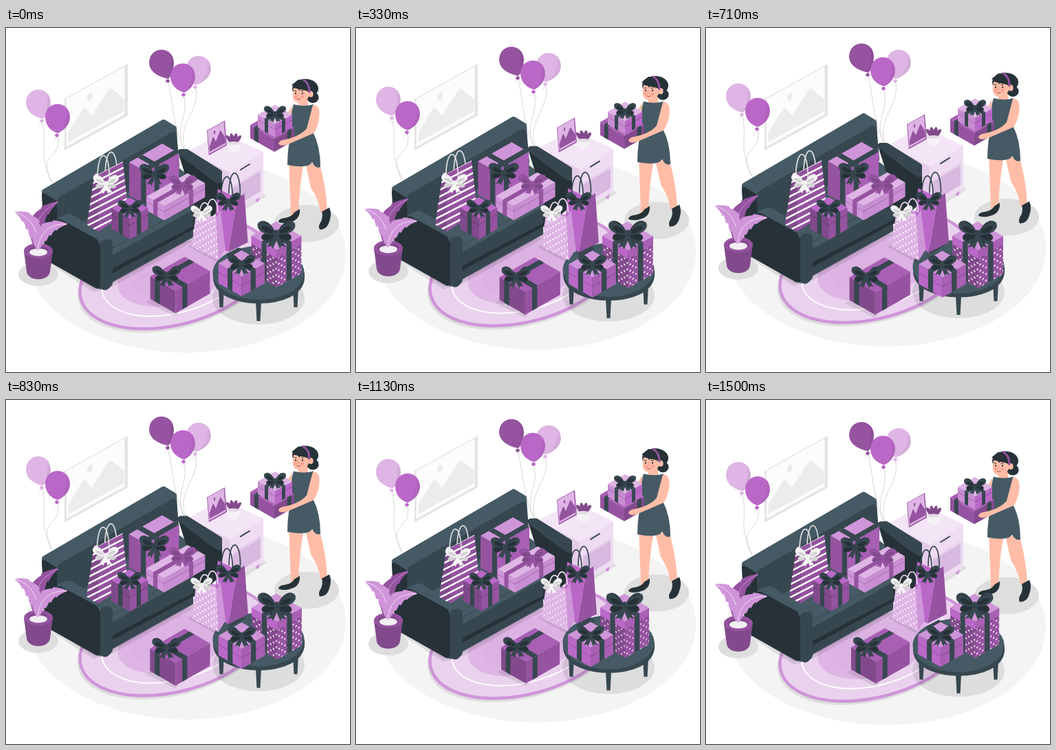
These frames come from a looping animation (500 px wide and 500 px high, 1540 ms). An HTML page:

```html
<!DOCTYPE html>
<html lang="en">
<head>
<meta charset="utf-8">
<title>Gifts</title>
<style>
html, body { margin: 0; height: 100%; overflow: hidden; background: #fff; }
svg { display: block; width: 100vw; height: 100vh; }
</style>
</head>
<body>
<svg viewBox="0 0 500 500" xmlns="http://www.w3.org/2000/svg">
<defs>
  <pattern id="dots" width="8" height="9" patternUnits="userSpaceOnUse">
    <circle cx="2" cy="2" r="1.1" fill="#fff"/><circle cx="6" cy="6.500" r="1.1" fill="#fff"/>
  </pattern>
  <pattern id="dotsL" href="#dots" patternTransform="skewY(30)"/>
  <pattern id="dotsR" href="#dots" patternTransform="skewY(-30)"/>
  <pattern id="stripes" width="10" height="9.4" patternUnits="userSpaceOnUse" patternTransform="skewY(-27)">
    <rect width="10" height="2.8" fill="#fff"/>
  </pattern>
</defs>
<g id="wall"></g><g id="room"></g><g id="gifts"></g>
</svg>
<script>
const TONE = { deep: '#824a8c', dark: '#9553a0', mid: '#a85fb4', base: '#ba68c8', soft: '#c98dd3', light: '#cf95d9', pale: '#deb5e4', mist: '#ead2ee' };
const INK = '#263238', SLATE = '#37474f', STEEL = '#455a64', SKIN = '#ffbda7', GREY = '#dedede', SHADE = '#00000018';
const ISO = .57;

const path = (d, fill) => `<path d="${d}" fill="${fill}"/>`;
const poly = (points, fill) => `<polygon points="${points}" fill="${fill}"/>`;
const line = (d, color, w = 1) => `<path d="${d}" fill="none" stroke="${color}" stroke-width="${w}" stroke-linecap="round" stroke-linejoin="round"/>`;
const oval = (x, y, rx, ry, fill, turn = 0, extra = '') =>
  `<ellipse cx="${x}" cy="${y}" rx="${rx}" ry="${ry}" fill="${fill}" transform="rotate(${turn} ${x} ${y})" ${extra}/>`;
// Polygon with corners rounded outwards by r.
const soft = (points, fill, r) =>
  `<polygon points="${points}" fill="${fill}" stroke="${fill}" stroke-width="${2 * r}" stroke-linejoin="round"/>`;

function bow(x, y, size, color = SLATE, shade = INK) {
  const wing = path('M0 0L-11 16-6 15-4 18 2 4Z', color) + path('M0 0C-8-2-18 0-17 6C-15 11-5 8 0 0Z', shade)
    + path('M-1 2C-4-12-16-18-21-11C-24-3-12 3-1 2Z', color) + path('M-2 0C-7-7-14-9-17-7C-16-2-9 1-2 0Z', shade)
    + line('M-2-2Q-7-11-14-12M-3 3L-8 12', shade, .8);
  return `<g transform="translate(${x} ${y}) scale(${size})">${wing}<g transform="scale(-1 1)">${wing}</g>`
    + oval(0, 0, 4, 3.6, color) + line('M-2-2Q0-1 0 3', shade, .7) + '</g>';
}

// Isometric gift: (x, y) is the front top corner, l and r the widths seen left and right,
// u and v the places of the ribbons along them; tones name the left, right and top faces.
function gift(x, y, l, r, h, tones, { u = .5, v = .5, w = 7, lid = 0, dots, ribbon = [SLATE, INK], knot = 1, drop = 0 } = {}) {
  const [left, right, top] = tones.split(' ').map(name => TONE[name]);
  const at = (a, b, z = 0) => [x - a * l + b * r, y - ISO * (a * l + b * r) + z];
  const quad = (fill, ...points) => poly(points.join(' '), fill);
  const sideL = (a, b, z0, z1, fill) => quad(fill, at(a, 0, z0), at(b, 0, z0), at(b, 0, z1), at(a, 0, z1));
  const sideR = (a, b, z0, z1, fill) => quad(fill, at(0, a, z0), at(0, b, z0), at(0, b, z1), at(0, a, z1));
  const lay = (a0, a1, b0, b1, fill) => quad(fill, at(a0, b0), at(a1, b0), at(a1, b1), at(a0, b1));
  const sides = (z0, z1, fillL, fillR = fillL) => sideL(0, 1, z0, z1, fillL) + sideR(0, 1, z0, z1, fillR);
  const du = w / l / 2, dv = w / r / 2;
  let s = sides(0, h, left, right);
  if (dots) s += sides(lid, h, 'url(#dotsL)', 'url(#dotsR)') + sides(0, lid, TONE.base, TONE.mid);
  if (lid) s += sides(lid, lid + 1.2, '#00000030');
  s += lay(0, 1, 0, 1, top) + lay(u - du, u + du, 0, 1, ribbon[0]) + lay(0, 1, v - dv, v + dv, ribbon[0]);
  s += sideL(u - du, u + du, 0, h, ribbon[0]) + sideR(v - dv, v + dv, 0, h, ribbon[0]);
  const [cx, cy] = at(u, v);
  return s + bow(cx, cy + drop, knot, ...ribbon);
}

// Bag from its left, middle and right edges, each written "top bottom".
function bag(edges, tones, pattern, [hx, hy, hw, hh], cord) {
  const [a, b, c] = edges.map(e => e.split(' '));
  const faces = [[a, b], [b, c]].map(([p, q]) => [p[0], q[0], q[1], p[1]].join(' '));
  const loop = (x, y) => line(`M${x} ${y}C${x} ${y - hh * 1.35} ${x + hw} ${y - hh * 1.35} ${x + hw} ${y}`, cord, 1.7);
  return loop(hx + 11, hy - 5) + faces.map((f, i) => poly(f, TONE[tones[i]]) + (pattern[i] ? poly(f, `url(#${pattern[i]})`) : '')).join('') + loop(hx, hy);
}

// Framed landscape on a wall, drawn in a unit square.
const picture = (x, y, w, h, lean, frame, back, hills) =>
  `<g transform="matrix(1 -.555 ${lean} 1 ${x} ${y}) scale(${w} ${h})">`
  + poly('0,0 1,0 1,1 0,1', frame) + poly('.03,.02 .95,.02 .95,.95 .03,.95', back)
  + path('M.06 .88V.7L.28 .4Q.31 .37 .34 .42L.43 .62 .69 .31Q.72 .27 .75 .32L.94 .64V.88Z', hills)
  + oval(.4, .23, .045, .075, hills) + '</g>';

function balloon(x, y, color, tilt, endX, endY) {
  const kx = x + tilt, ky = y + 25;
  return line(`M${kx} ${ky}C${kx + 10} ${ky + 35} ${endX - 22} ${endY - 45} ${endX} ${endY}`, '#cfcfcf', .8)
    + path(`M${x - 18} ${y - 2}c0-26 36-26 36 0Q${x + 17} ${y + 13} ${kx + 1} ${ky - 4}Q${x - 17} ${y + 15} ${x - 18} ${y - 2}Z`, color)
    + path(`M${x + 13} ${y - 15}Q${x + 15} ${y + 10} ${kx} ${ky - 4}Q${x + 27} ${y + 10} ${x + 13} ${y - 15}Z`, '#0000000d')
    + oval(kx, ky - 1, 2.8, 2.5, color) + line(`M${kx - 4} ${ky + 8}q0-5 4-6 3 2 4 5`, '#ddd', .7);
}

// Feathered leaf along a curve from the pot to its tip.
function leaf(bendX, bendY, tipX, tipY, width, fill, vein) {
  const rootX = 46, rootY = 322, steps = 40, edge = [[], []];
  for (let i = 0; i <= steps; i++) {
    const t = i / steps, s = 1 - t;
    const x = s * s * rootX + 2 * s * t * bendX + t * t * tipX, y = s * s * rootY + 2 * s * t * bendY + t * t * tipY;
    const dx = s * (bendX - rootX) + t * (tipX - bendX), dy = s * (bendY - rootY) + t * (tipY - bendY), len = Math.hypot(dx, dy);
    const half = width * Math.sin(Math.PI * t ** .85) ** .8 * (1 - .3 * (t * 4 % 1));
    edge[0].push([x - dy / len * half, y + dx / len * half]);
    edge[1].unshift([x + dy / len * half, y - dx / len * half]);
  }
  return soft(edge.flat().map(p => p.map(n => n.toFixed(1))).join(' '), fill, .8)
    + line(`M${rootX} ${rootY}Q${bendX} ${bendY} ${tipX} ${tipY}`, vein, .9);
}

const rug = (k, fill, extra) => oval(245, 357, 141 * k, 74 * k, fill, -15, extra);
const floor = oval(262, 330, 232, 142, '#f4f4f4')
  + oval(47, 358, 29, 17, GREY) + oval(437, 284, 47, 27, GREY) + poly('325,270 374,240 379,244 330,275', GREY)
  + `<g transform="translate(-1 4)">${rug(1.02, GREY)}</g>` + rug(1, TONE.mist, `stroke="${TONE.light}" stroke-width="4.500"`)
  + rug(.77, 'none', 'stroke="#fff" stroke-width="1.8"') + rug(.6, TONE.pale) + rug(.45, '#dcb2e2')
  + soft('60,336 128,380 154,372 275,304 60,325', SHADE, 4);

const balloons = balloon(47, 111, TONE.pale, 5, 67, 224) + balloon(75, 132, TONE.base, -1, 66, 224)
  + balloon(280, 62, TONE.pale, -5, 264, 185) + balloon(226, 53, TONE.dark, 9, 262, 183) + balloon(257, 73, TONE.base, 1, 262, 185);

const nightstand = poly('363,246 363,252 367,253 370,242', TONE.light)
  + poly('265,179 315,152 374,180 325,210', '#f3e5f6') + poly('265,179 325,210 325,272 265,238', '#e5cdea')
  + poly('325,210 374,180 374,243 325,271', '#efdcf3') + poly('330,232 370,208 370,237 330,262', '#d8b9df')
  + line('M330 230L370 206', '#dcbfe2') + line('M341 206L354 198', SLATE, 2)
  + picture(292, 149, 26, 36, .08, TONE.dark, TONE.pale, TONE.dark)
  + [-40, -14, 14, 40].map(turn => `<g transform="rotate(${turn} 331 169)">${oval(331, 161, 3, 8.500, TONE.deep)}</g>`).join('')
  + path('M321 167h19Q341 180 331 181Q321 180 321 167Z', '#f5f2f6') + oval(330.5, 167.500, 9, 2.5, '#e3dae6');

const sofa = soft('56,238 229,137 244,146 247,200 120,286 60,296', STEEL, 4)
  + soft('55,243 71,253 73,285 58,297', INK, 3) + soft('80,250 243,156 247,200 150,280 79,288', SLATE, 5)
  + poly('100,290 240,195 300,240 285,262 153,329', STEEL)
  + soft('254,180 262,180 310,210 310,260 275,290 275,246', INK, 4) + soft('254,181 262,180 310,210 310,222 297,214', SLATE, 4)
  + poly('150,322 272,256 272,304 150,372', SLATE) + poly('150,323 274,256 274,263 153,331', STEEL)
  + poly('150,352 272,288 272,293 150,359', INK)
  + soft('80,280 92,276 148,309 149,368 138,374', STEEL, 6)
  + soft('71,290 78,283 129,311 133,320 133,374 62,334 60,305', INK, 5) + soft('144,315 148,314 148,370 144,374', SLATE, 7);

const plant = leaf(32, 274, 75, 253, 10, TONE.dark, TONE.light)
  + path('M26 324L30 354C32 369 62 369 64 354L68 324Z', TONE.deep) + oval(47, 324, 21, 11, TONE.dark)
  + oval(47, 324, 15, 7, TONE.deep) + oval(47, 326, 13, 5.5, '#f2eef3')
  + leaf(48, 278, 14, 268, 11, TONE.light, '#f4e6f6') + leaf(50, 284, 88, 285, 10, TONE.light, '#f4e6f6');

const leg = (x, y) => poly(`${x - 4},${y - 28} ${x + 4},${y - 28} ${x + 2.5},${y} ${x - 2.5},${y}`, SLATE);
const table = oval(367, 393, 67, 38, SHADE) + leg(313, 406) + leg(421, 406) + leg(367, 426)
  + path('M301 356V363C302 413 433 413 434 363V356Z', SLATE) + oval(367, 356, 66.5, 39, STEEL)
  + poly('320,329 338,319 348,325 326,338', SLATE);

const woman = path('M435 196L456 198Q465 230 467 264L457 268Q455 250 443 232Z', SKIN)
  + path('M411 192L433 196Q427 225 425 268L414 274Q413 240 411 192Z', SKIN)
  + path('M427 263Q428 275 419 280 405 286 396 282 396 277 406 276 416 274 419 268Z', INK)
  + path('M470 261Q474 270 470 281 467 293 456 293 453 288 458 281 461 274 459 267Z', INK)
  + soft('426,102 437,102 437,112 427,114', SKIN, 2) + poly('417,112 409,124 414,130', SKIN)
  + path('M418 111Q433 115 447 111 452 130 446 151 457 172 457 202 450 205 445 195 440 205 409 199 409 170 416 151 412 130 418 111Z', STEEL)
  + oval(435, 88, 19, 14, INK) + oval(446, 101, 8.500, 8, INK)
  + path('M418 87Q415 101 419 106 425 111 434 106 442 102 441 92Z', SKIN) + oval(443, 96, 3.6, 4.500, SKIN)
  + path('M415 83Q424 86 426 91 428 86 440 93L439 78 425 75Z', INK) + line('M432 75Q441 80 441 93', TONE.dark, 3)
  + [421, 431].map(x => oval(x, 95, 1, 1.5, INK) + oval(x, 100, 2.4, 1.8, '#ff9a88') + line(`M${x - 2} 91.500h3`, INK)).join('')
  + line('M425 95L424 99h2', '#ee917b', .8) + line('M423 103Q425 105 428 103', '#9c3d46');
const carried = gift(390, 161, 35, 29, 19, 'dark deep mid', { u: .75, v: .75, w: 6, knot: 0 })
  + gift(391, 140, 25, 25, 19, 'soft base pale', { w: 5, lid: 7, ribbon: [SLATE, INK], knot: .75, drop: -2 });
const arm = path('M446 112C462 110 455 144 447 153L410 169Q399 173 396 168 397 163 406 162 428 157 437 146Z', SKIN);

const white = ['#f7f7f7', '#d4d4d4'];
const presents = [
  gift(205, 211, 24, 47, 47, 'dark mid light', { u: .15, v: .33, drop: 13, knot: .98 }),
  bag(['132,212 121,286', '138,214 137,296', '172,196 180,268'], ['deep', 'dark'], ['stripes', 'stripes'], [136, 220, 17, 32], '#dedede'),
  bow(148, 227, .85, ...white),
  gift(231, 260, 25, 58, 20, 'light soft pale', { v: .66, w: 6, lid: 7, ribbon: [TONE.dark, TONE.deep], knot: .9, drop: -3 }),
  gift(182, 277, 26, 26, 30, 'deep dark base', { w: 6, lid: 9, knot: .8 }),
  bag(['307,235 301,312', '335,248 322,325', '345,242 350,311'], ['base', 'dark'], [], [312, 246, 16, 28], SLATE),
  bow(322, 252, .83),
  poly('265,317 270,313 309,336 305,339', SHADE),
  bag(['276,270 270,317', '305,275 308,336', '311,265 318,320'], ['pale', 'light'], ['dotsL'], [281, 273, 15, 18], '#eadcec'),
  bow(284, 269, .72, ...white),
  poly('205,396 214,390 252,412 246,416', SHADE),
  gift(247, 380, 36, 49, 32, 'deep dark mid', { u: .72, v: .27, knot: .95 }),
  gift(391, 322, 36, 35, 53, 'deep dark light', { lid: 12, dots: true, knot: 1.25, drop: -4 }),
  gift(341, 360, 33, 33, 28, 'base mid light', { lid: 12, knot: .92 })
].join('');

const byId = id => document.getElementById(id);
byId('wall').innerHTML = picture(85, 103, 92, 75, 0, '#e4e4e4', '#fcfcfc', '#ececec');
byId('room').innerHTML = floor + balloons + nightstand + sofa + plant + table + woman + carried + arm;
byId('gifts').innerHTML = presents;

const LOOP = 1540, LEAD = 65;
const tent = (q, from, peak, to) => Math.max(0, Math.min((q - from) / (peak - from), (to - q) / (to - peak)));

const start = performance.now();
function draw(now) {
  const q = (Math.max(0, now - start) + LEAD) % LOOP / LOOP;
  const lift = .84 - 10 * tent(q, 0, .5, 1);
  const beat = 1 + .1 * tent(q, .016, .14, .33) + .04 * tent(q, .38, .5, .73);
  byId('room').setAttribute('transform', `translate(0 ${lift})`);
  byId('gifts').setAttribute('transform', `translate(275 290) scale(${beat}) translate(-275 -290)`);
  requestAnimationFrame(draw);
}
draw(start);
</script>
</body>
</html>
```
